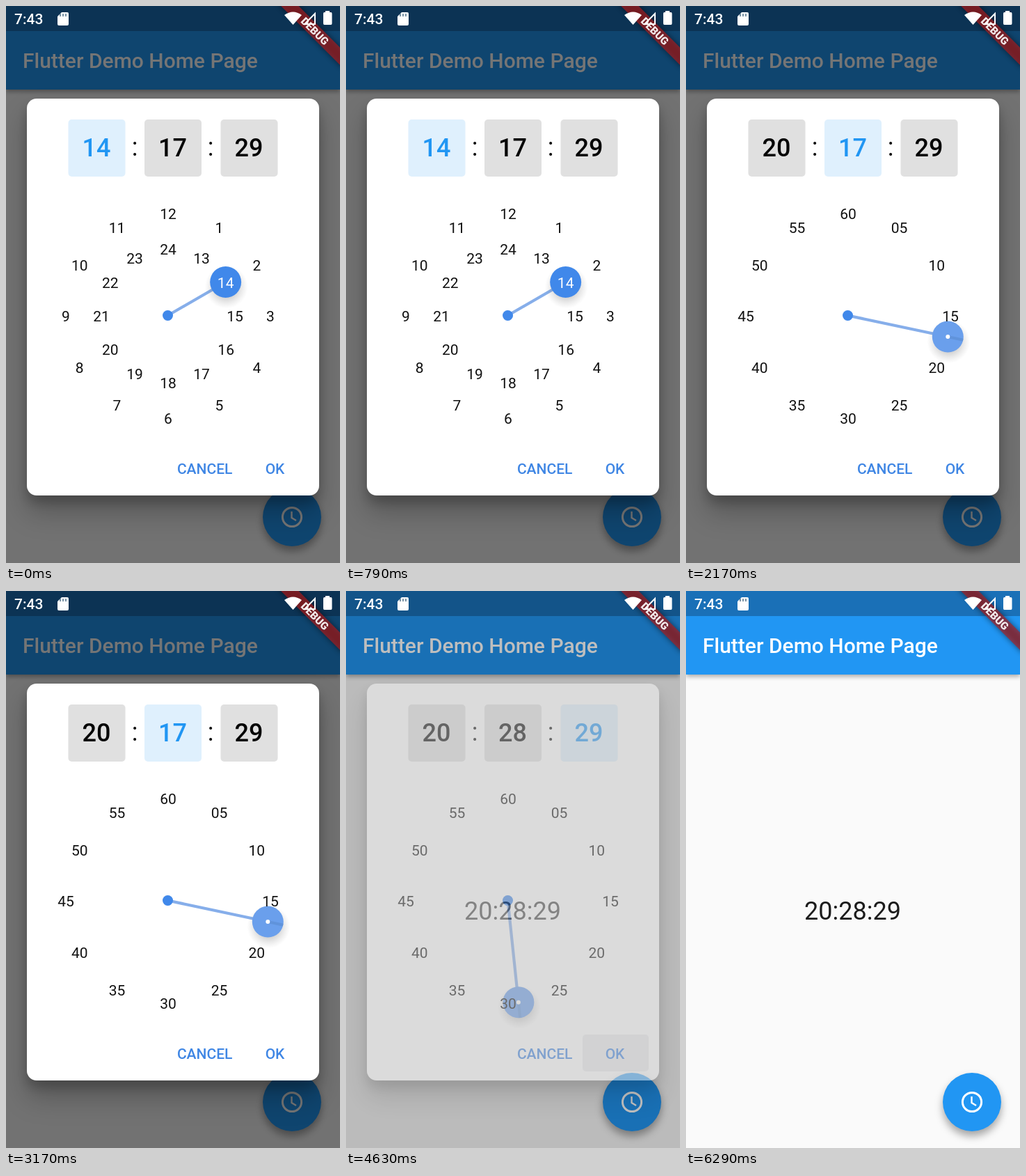
An HTML page for the animation above (6500 ms loop, 480 px wide and 800 px high).

```html
<!DOCTYPE html>
<html lang="en">
<head>
<meta charset="utf-8">
<title>Time picker</title>
<style>
  html, body { margin: 0; width: 100%; height: 100%; overflow: hidden; background: #fafafa; }
  svg { display: block; width: 480px; height: 800px; font-family: Roboto, sans-serif; }
  text { white-space: pre; }
  .mid { text-anchor: middle; }
  .medium { font-weight: 500; }
  .bar { filter: drop-shadow(0 3px 3px rgba(0, 0, 0, .32)); }
  .fab { filter: drop-shadow(0 7px 6px rgba(0, 0, 0, .34)); }
  .card { filter: drop-shadow(0 10px 8px rgba(0, 0, 0, .2)) drop-shadow(0 22px 18px rgba(0, 0, 0, .24)); }
  .blur { filter: blur(4px); }
  .tile { font-size: 36px; font-weight: 500; }
  .labels { font-size: 21px; fill: #111; }
  .action { font-size: 21px; font-weight: 500; fill: #3f86e4; }
</style>
</head>
<body>
<svg viewBox="0 0 480 800">
  <defs>
    <radialGradient id="soft">
      <stop offset=".3" stop-color="#444" stop-opacity=".45"/>
      <stop offset="1" stop-color="#888" stop-opacity="0"/>
    </radialGradient>
  </defs>

  <rect width="480" height="800" fill="#fafafa"/>
  <text class="mid" x="239.5" y="472" font-size="36" fill="#1c1c1c">20:28:29</text>
  <rect class="bar" width="480" height="120" fill="#2196f3"/>
  <rect width="480" height="36" fill="#1a70b7"/>
  <text class="medium" x="24" y="89" font-size="30" fill="#fff">Flutter Demo Home Page</text>
  <circle class="fab" cx="411" cy="734" r="42" fill="#2196f3"/>
  <g fill="none" stroke="#fff" stroke-width="3">
    <circle cx="411" cy="734" r="13.6"/>
    <path d="M410.5 726V735L417 739" stroke-width="2.4"/>
  </g>

  <rect id="dim" width="480" height="800" fill="#000"/>

  <g id="dialog">
    <rect class="card" x="30" y="133" width="420" height="570" rx="14" fill="#fff"/>
    <g id="tiles"></g>
    <g class="mid" font-size="36" fill="#111">
      <text x="185" y="215">:</text>
      <text x="294" y="215">:</text>
    </g>
    <g id="hours" class="labels mid"></g>
    <circle id="glow" r="56" fill="url(#soft)" opacity=".35"/>
    <line id="arm" stroke="#86aeea" stroke-width="4.2"/>
    <circle cx="232.5" cy="444.5" r="7.5" fill="#4088ea"/>
    <circle id="shade" r="31" fill="url(#soft)" opacity=".8"/>
    <circle id="knob" r="22.5"/>
    <line id="tail" stroke="#5a8cd0" stroke-width="4" opacity=".6"/>
    <circle id="dot" r="3" fill="#fff"/>
    <text id="pick" class="mid" font-size="21" fill="#fff"></text>
    <g id="sixty" class="labels mid"></g>
    <rect id="press" x="340" y="637" width="95" height="53" rx="5" fill="#456" opacity=".1"/>
    <g class="action mid">
      <text x="285.7" y="672">CANCEL</text>
      <text x="386.5" y="672">OK</text>
    </g>
  </g>

  <g transform="translate(480 0) rotate(45)">
    <rect class="blur" x="-66" y="42" width="132" height="18" opacity=".5"/>
    <rect x="-66" y="42" width="132" height="18" fill="#b71c1c" opacity=".63"/>
    <text class="mid" y="56.5" font-size="15.3" font-weight="900" fill="#fff" opacity=".9">DEBUG</text>
  </g>
  <g fill="#fff">
    <text class="medium" x="12" y="26" font-size="21">7:43</text>
    <path d="M80 9H88Q90 9 90 11V26Q90 28 88 28H76Q74 28 74 26V15Z"/>
    <path d="M400 13Q412.5 4 425 13L412.5 27Z"/>
    <path d="M429 26H444V11Z" fill="none" stroke="#fff" stroke-width="2"/>
    <path d="M459 9V7H465V9H467Q468.5 9 468.5 11V25Q468.5 27 467 27H457.5Q456 27 456 25V11Q456 9 457.5 9Z"/>
  </g>
  <path d="M78 11V15M82 11V15M86 11V15" stroke="#4f7088" stroke-width="1.5"/>
</svg>

<script>
const LOOP = 6500;
const CX = 232.5, CY = 444.5, OUTER = 147, INNER = 96, KNOB = 22.5;
const $ = id => document.getElementById(id);
const clamp = x => Math.min(1, Math.max(0, x));
const ramp = (t, from, to) => clamp((t - from) / (to - from));
const smooth = x => x * x * (3 - 2 * x);
const two = n => String(n).padStart(2, '0');

function set(el, attrs) {
  for (const key in attrs) el.setAttribute(key, attrs[key]);
}
function add(parent, tag, attrs, text = '') {
  const el = document.createElementNS('http://www.w3.org/2000/svg', tag);
  set(el, attrs);
  el.textContent = text;
  return parent.appendChild(el);
}
function polar(turn, r) {
  const a = turn * 2 * Math.PI;
  return [CX + r * Math.sin(a), CY - r * Math.cos(a)];
}
function ring(parent, r, label) {
  for (let i = 1; i <= 12; i++) {
    const [x, y] = polar(i / 12, r);
    add(parent, 'text', { x: x + .5, y: Math.round(y + 8.7) }, label(i));
  }
}
function line(id, from, to) {
  set($(id), { x1: from[0], y1: from[1], x2: to[0], y2: to[1] });
}
function show(id, on) {
  $(id).style.display = on ? '' : 'none';
}

ring($('hours'), OUTER, i => i);
ring($('hours'), INNER, i => i + 12);
ring($('sixty'), OUTER, i => two(i * 5));

const tiles = [130.5, 240, 349.5].map(x => ({
  box: add($('tiles'), 'rect', { x: x - 41, y: 163, width: 82, height: 82, rx: 5 }),
  text: add($('tiles'), 'text', { x: x - .5, y: 216, class: 'tile mid' })
}));

function render(t) {
  const mode = t < 2170 ? 0 : t < 4310 ? 1 : 2;
  const hour = 14 + 6 * smooth(ramp(t, 1400, 1880));
  const minute = 17 + 11 * smooth(ramp(t, 3210, 3500));
  const values = [hour, minute, 29];
  const fade = ramp(t, 4520, 4730);

  set($('dim'), { opacity: .54 * (1 - fade) });
  set($('dialog'), { opacity: 1 - fade });
  show('dialog', fade < 1);
  if (fade === 1) return;

  tiles.forEach(({ box, text }, i) => {
    set(box, { fill: i === mode ? '#dff0fd' : '#e0e0e0' });
    set(text, { fill: i === mode ? '#2196f3' : '#050505' });
    text.textContent = two(Math.round(values[i]));
  });
  show('hours', mode === 0);
  show('sixty', mode > 0);
  show('press', t >= 4420);

  const value = values[mode];
  const turn = mode ? value / 60 : value / 12;
  const r = mode ? OUTER : INNER;
  const onHour = mode === 0 && Math.abs(value - Math.round(value)) < .1;
  const [x, y] = polar(turn, r);

  line('arm', [CX, CY], [x, y]);
  line('tail', [x, y], polar(turn, r + KNOB));
  set($('shade'), { cx: x + 1, cy: y + 7 });
  set($('glow'), { cx: x + 4, cy: y + 32 });
  set($('knob'), { cx: x, cy: y, fill: onHour ? '#4088ea' : '#6a9fec' });
  set($('dot'), { cx: x, cy: y });
  set($('pick'), { x, y: y + 8 });
  $('pick').textContent = Math.round(hour);
  show('tail', !onHour);
  show('dot', !onHour);
  show('pick', onHour);
  show('glow', t >= 1380 && t < 1460);
}

const start = performance.now();
function tick() {
  render((performance.now() - start) % LOOP);
  requestAnimationFrame(tick);
}
tick();
</script>
</body>
</html>
```
